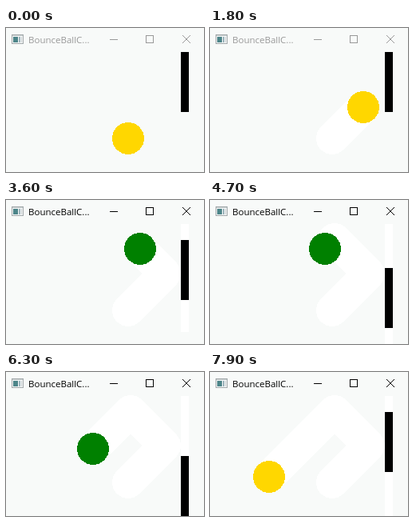
An HTML page that plays this animation: 248x180 px, repeating every 8 s.

```html
<!DOCTYPE html>
<html lang="en">
<head>
<meta charset="utf-8">
<title>Bouncing ball</title>
<style>
  html, body { margin: 0; width: 100%; height: 100%; overflow: hidden; background: #f8faf9; }
  svg { display: block; width: 248px; height: 180px; }
  text { font: 11.5px "Open Sans", "Noto Sans", sans-serif; }
</style>
</head>
<body>
<svg viewBox="0 0 248 180">
  <rect width="248" height="180" fill="#f8faf9"/>
  <g shape-rendering="crispEdges">
    <rect x="7.5" y="8.5" width="14" height="11" fill="#f4f6f6" stroke="#a3a9ab"/>
    <path d="M8 9.5H21" stroke="#c5cccd"/>
    <rect x="9" y="11" width="6" height="7" fill="#4d8589"/>
    <rect x="16" y="11" width="2" height="7" fill="#9bb3bb"/>
    <rect x="19" y="11" width="1" height="7" fill="#c9d0d2"/>
  </g>
  <g id="chrome">
    <text x="28" y="19" fill="currentColor">BounceBallC...</text>
    <g fill="none" stroke="currentColor">
      <path d="M130 14.5H140M175.5 9.5H184.5V18.5H175.5Z" shape-rendering="crispEdges"/>
      <path d="M221 9L231 19M231 9L221 19"/>
    </g>
  </g>
  <g shape-rendering="crispEdges">
    <polyline id="trail" fill="none" stroke="#fff" stroke-width="40" stroke-linecap="round" stroke-linejoin="round"/>
    <rect id="track" x="219" y="30" width="10" fill="#fff"/>
    <rect id="paddle" x="219" width="10" height="75"/>
    <circle id="ball" r="20"/>
  </g>
</svg>
<script>
const LOOP = 8000, STEP = 100;

// The ball moves one pixel diagonally per tick and is reflected twice.
const BALL_TICK = 46.2, BALL_LEAD = 3;
const WALL_HIT = 46, CEILING_HIT = 89;
const ACTIVATED = 2200, RECOLOURED = 7100;

// The paddle runs at constant speed between turning points, in 5 px hops.
const PADDLE_START = 2890, PADDLE_SPEED = 0.141;
const PADDLE_TOP = 30, PADDLE_HEIGHT = 75, PADDLE_HOP = 5;
const paddleTurns = [30, 90, 30, 125, 65, 142, 60, 159, 18, 60];

const el = id => document.getElementById(id);
const set = (id, attrs) => {
  for (const name in attrs) el(id).setAttribute(name, attrs[name]);
};

const ballAt = d => [199 - Math.abs(WALL_HIT - d), 49 + Math.abs(CEILING_HIT - d)];

function paddleAt(t) {
  let left = Math.max(0, t - PADDLE_START) * PADDLE_SPEED;
  let y = paddleTurns[0];
  for (const turn of paddleTurns) {
    const move = Math.min(left, Math.abs(turn - y));
    y += Math.sign(turn - y) * move;
    left -= move;
  }
  return Math.max(PADDLE_TOP, PADDLE_HOP * Math.round(y / PADDLE_HOP));
}

function render(time) {
  const t = Math.floor(time / STEP) * STEP;
  const d = Math.floor((t + BALL_LEAD) / BALL_TICK);
  const [x, y] = ballAt(d);
  const green = t >= ACTIVATED && t < RECOLOURED;
  set("ball", { cx: x, cy: y, fill: green ? "#008000" : "#ffd700" });

  const corners = [0, WALL_HIT, CEILING_HIT].filter(c => c < d);
  set("trail", { points: [...corners, d].map(ballAt).join(" ") });

  let lowest = PADDLE_TOP;
  for (let s = 0; s <= t; s += STEP) lowest = Math.max(lowest, paddleAt(s));
  set("paddle", { y: paddleAt(t) });
  set("track", { height: lowest - PADDLE_TOP + PADDLE_HEIGHT });

  el("chrome").style.color = t >= ACTIVATED ? "#000" : "#999";
}

const start = performance.now();
function tick() {
  render((performance.now() - start) % LOOP);
  requestAnimationFrame(tick);
}
tick();
</script>
</body>
</html>
```
